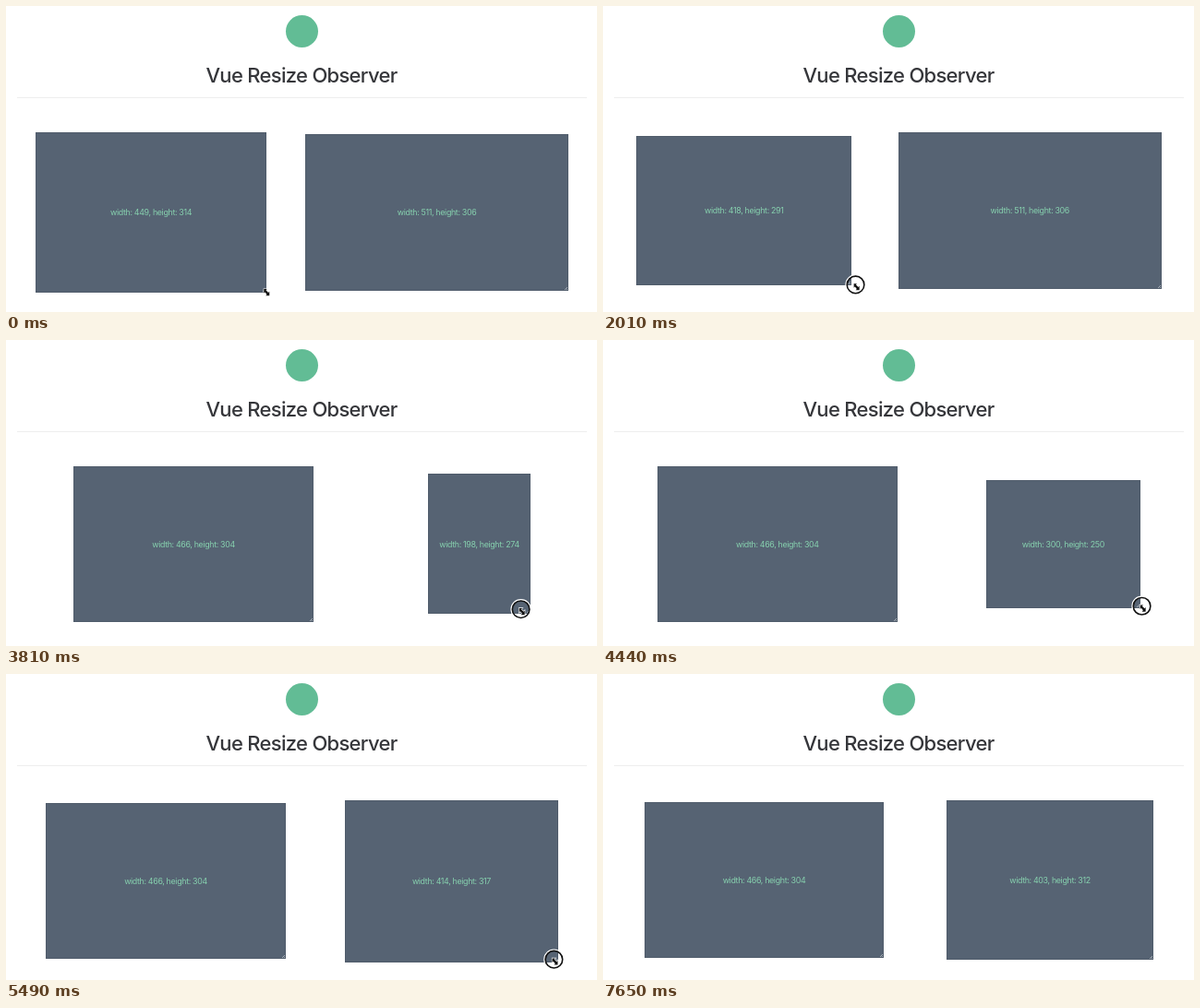
These frames come from a looping animation (640 px wide and 332 px high, 7.92 s). An HTML page:

```html
<!DOCTYPE html>
<html lang="en">
<head>
<meta charset="utf-8">
<title>Vue Resize Observer</title>
<style>
  html, body { margin: 0; width: 100%; height: 100%; overflow: hidden; background: #fff; }
  #stage { position: relative; width: 640px; height: 332px; overflow: hidden; font-family: Inter, "Open Sans", sans-serif; }
  #logo { position: absolute; left: 302.5px; top: 10px; width: 35px; height: 35px; border-radius: 50%; background: #62bc95; }
  h1 {
    position: absolute; left: 0; top: 60px; width: 640px; margin: 0;
    font-size: 22px; line-height: 30px; font-weight: 500; letter-spacing: -.7px;
    text-align: center; color: #35363a;
  }
  #rule { position: absolute; left: 12px; top: 99px; width: 617px; height: 1px; background: #eee; }
  #row {
    position: absolute; left: 11px; top: 136.5px; width: 619px;
    display: flex; justify-content: space-around; align-items: center;
  }
  .box {
    position: relative; flex: none; box-sizing: border-box;
    display: flex; justify-content: center; align-items: center;
    background: #566373; border: 1px solid #505c6b;
    color: #86d0ae; font-size: 8.9px; letter-spacing: -.35px; white-space: nowrap;
  }
  .box::after {
    content: ""; position: absolute; right: 0; bottom: 0; width: 4px; height: 4px;
    background: linear-gradient(135deg, transparent 52%, #a3abb3 52% 66%, transparent 66% 80%, #a3abb3 80%);
  }
  #pointer { position: absolute; left: 0; top: 0; overflow: visible; }
</style>
</head>
<body>
<div id="stage">
  <div id="logo"></div>
  <h1>Vue Resize Observer</h1>
  <div id="rule"></div>
  <div id="row">
    <div class="box"><span></span></div>
    <div class="box"><span></span></div>
  </div>
  <svg id="pointer" width="1" height="1">
    <g id="ring" fill="none">
      <circle r="10.4" stroke="#fff" stroke-width="1.6"/>
      <circle r="9.3" stroke="#111" stroke-width="1.6"/>
    </g>
    <path d="M-3.6-3.6h3.4l-1.2 1.2L1.2 .2 2.4-1V3.6H-1.6L-.4 2.2-2.4-.2-3.6 1z"
          transform="translate(1.7 2.3)" fill="#111" stroke="#fff" stroke-width="1.2" paint-order="stroke"/>
  </svg>
</div>
<script>
const LOOP = 7920, STEP = 30, SCALE = 0.557;
const ROW = { left: 11, top: 136.5, width: 619 };

// Each key: time in ms, width, height
const tracks = [
  [[375, 449, 314], [600, 330, 250], [780, 390, 235], [1020, 524, 308], [1110, 520, 322],
   [1200, 464, 311], [1440, 300, 260], [1650, 260, 225], [1850, 330, 245], [2010, 418, 291],
   [2160, 476, 320], [2310, 440, 335], [2490, 390, 305], [2640, 440, 292], [2790, 466, 304]],
  [[3495, 511, 306], [3600, 450, 302], [3810, 198, 274], [3930, 170, 238], [4110, 195, 212],
   [4290, 268, 238], [4440, 300, 250], [4600, 345, 266], [4760, 435, 302], [4920, 385, 292],
   [5100, 310, 268], [5250, 345, 282], [5400, 422, 312], [5490, 414, 317], [5700, 330, 300],
   [5900, 290, 268], [6100, 315, 282], [6300, 380, 315], [6420, 400, 329], [6570, 396, 322],
   [6720, 400, 313], [6960, 403, 312]]
];

const boxes = [...document.querySelectorAll('.box')];
const labels = boxes.map(box => box.firstElementChild);
const pointer = document.getElementById('pointer');
const ring = document.getElementById('ring');

function slope(keys, i, axis) {
  const before = keys[i - 1], after = keys[i + 1];
  return before && after ? (after[axis] - before[axis]) / (after[0] - before[0]) : 0;
}

function sample(keys, t, axis) {
  const last = keys.length - 1;
  if (t <= keys[0][0]) return keys[0][axis];
  if (t >= keys[last][0]) return keys[last][axis];
  const i = keys.findIndex(key => key[0] > t) - 1;
  const a = keys[i], b = keys[i + 1], span = b[0] - a[0], u = (t - a[0]) / span;
  const ease = u * u * (3 - 2 * u);
  return a[axis] + (b[axis] - a[axis]) * ease
    + span * u * (1 - u) * ((1 - u) * slope(keys, i, axis) - u * slope(keys, i + 1, axis));
}

const sizeAt = t => tracks.map(keys => [sample(keys, t, 1), sample(keys, t, 2)]);

function corner(sizes, index) {
  const [[w0, h0], [w1, h1]] = sizes;
  const gap = (ROW.width - (w0 + w1) * SCALE) / 4;
  const right = index ? ROW.left + ROW.width - gap : ROW.left + gap + w0 * SCALE;
  const bottom = ROW.top + (Math.max(h0, h1) + sizes[index][1]) * SCALE / 2;
  return [right - 1, bottom - 3];
}

// The pointer runs ahead of the corner while a box is being resized.
function grip(t, index) {
  const now = sizeAt(t), before = sizeAt(t - 10), after = sizeAt(t + 10);
  return corner(now, index).map((p, axis) =>
    p + 11 * (after[index][axis] - before[index][axis]) / 20);
}

function glide(from, to, u, bow) {
  const e = u * u * (3 - 2 * u);
  return [from[0] + (to[0] - from[0]) * e,
          from[1] + (to[1] - from[1]) * e + bow * Math.sin(Math.PI * u)];
}

function pointerAt(t) {
  if (t < 2820) return grip(t, 0);
  if (t < 3210) return glide(grip(2820, 0), grip(3210, 1), (t - 2820) / 390, 9);
  if (t < 7200) return grip(t, 1);
  return glide(grip(7200, 1), [578, 346], (t - 7170) / 150, 0);
}

function draw(t) {
  sizeAt(t).forEach(([w, h], i) => {
    boxes[i].style.width = w * SCALE + 'px';
    boxes[i].style.height = h * SCALE + 'px';
    labels[i].textContent = `width: ${Math.round(w)}, height: ${Math.round(h)}`;
  });
  const [x, y] = pointerAt(t);
  const pressed = t >= 60 && t < 2820 || t >= 3240 && t < 6990;
  pointer.style.transform = `translate(${x}px, ${y}px)`;
  pointer.style.display = t < 7320 ? 'block' : 'none';
  ring.style.opacity = pressed ? (t >= 60 && t < 150 ? 0.6 : 1) : 0;
}

const start = performance.now();
function tick() {
  const t = (performance.now() - start) % LOOP;
  draw(Math.floor(t / STEP) * STEP);
  requestAnimationFrame(tick);
}
draw(0);
requestAnimationFrame(tick);
</script>
</body>
</html>
```
